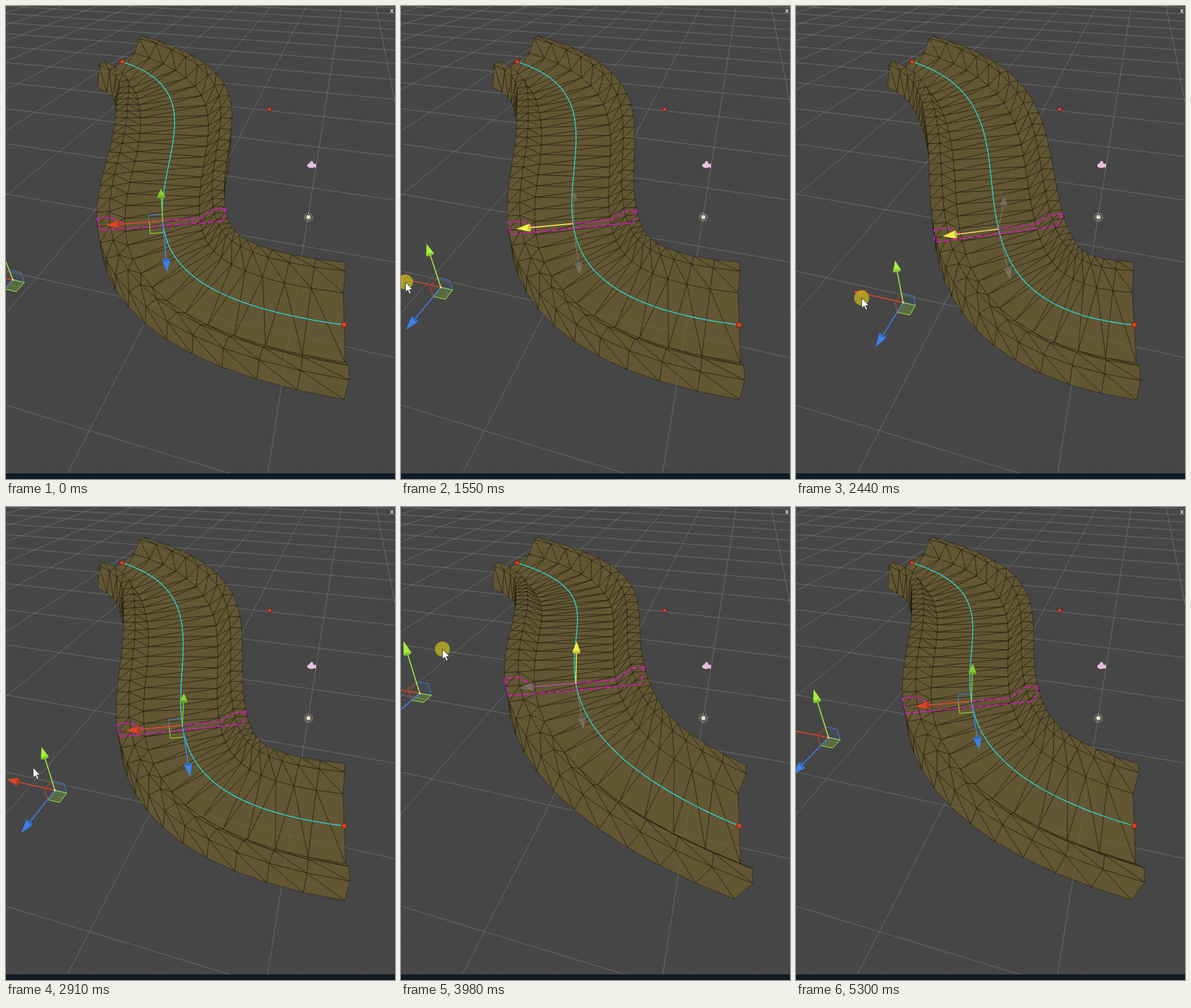
An HTML page with a canvas that plays this animation: 620 by 755 pixels, repeating every 5.82 s.

```html
<!DOCTYPE html>
<html lang="en">
<head>
<meta charset="utf-8">
<title>Spline mesh editing</title>
<style>
  html, body { margin: 0; width: 100%; height: 100%; overflow: hidden; background: #464646; }
  canvas { display: block; }
</style>
</head>
<body>
<canvas id="stage" width="620" height="755"></canvas>
<script>
const g = document.getElementById('stage').getContext('2d');
const LOOP = 5820, FOCAL = 663, CX = 310, CY = 377;

// Vectors live in camera space: x right, y down, z is depth.
const add = (a, b, s = 1) => a.map((v, i) => v + b[i] * s);
const cross = (a, b) => [a[1] * b[2] - a[2] * b[1], a[2] * b[0] - a[0] * b[2], a[0] * b[1] - a[1] * b[0]];
const unit = a => { const n = Math.hypot(...a); return a.map(v => v / n); };
const project = p => [CX + FOCAL * p[0] / p[2], CY + FOCAL * p[1] / p[2]];
const unproject = (x, y, depth) => [(x - CX) * depth / FOCAL, (y - CY) * depth / FOCAL, depth];

// World axes from their vanishing points.
const VANISH_X = [-2600, -157], VANISH_Z = [559, -157];
const AXIS_X = unit(unproject(...VANISH_X, FOCAL));
const AXIS_Z = unit(unproject(...VANISH_Z, FOCAL));
const UP = unit(unproject(310, 1200, FOCAL)).map(v => -v);
const BACK = AXIS_Z.map(v => -v), RIGHT = AXIS_X.map(v => -v);

const START = unproject(185, 89, 1), HANDLE_A = unproject(420, 165, 0.98);
const HANDLE_B = unproject(11, 437, 0.86), END = unproject(539, 509, 0.71);
const KNOT = 0.614, RINGS = 30;
const PROFILE = [[-.13, .03], [-.105, .03], [-.078, 0], [.078, 0], [.105, .03], [.13, .03], [.13, -.02], [-.13, -.02]];

const RED = '#dc4527', GREEN = '#a3f03c', BLUE = '#3d82ea', YELLOW = '#f3ee4a', GREY = 'rgba(140,140,130,.5)';

// Rows are time, value, ...
const SLIDE = [[1320, 0], [1820, .219], [2050, .283], [2440, .227], [2780, .0984]];
const LIFT = [[3150, 0], [3720, .088], [3980, .229], [4250, .283], [4480, .283], [4860, .1354]];
const POINTER = [
  [20, 430, 687], [600, 11, 484], [720, -45, 428], [1320, -45, 428], [1820, 109, 465],
  [2050, 168, 479], [2440, 105, 466], [2780, 18, 447], [2910, 43, 416], [3050, 58, 393],
  [3150, 58, 393], [3720, 62, 332], [3980, 66, 227], [4250, 70, 188], [4480, 70, 188],
  [4880, 84, 300], [5080, 243, 406], [5300, 625, 690]
];

// Monotone cubic interpolation through the rows.
function track(rows, t, col = 1) {
  const last = rows.length - 1;
  if (t <= rows[0][0]) return rows[0][col];
  if (t >= rows[last][0]) return rows[last][col];
  const i = rows.findIndex(r => r[0] > t) - 1;
  const slope = n => (rows[n + 1][col] - rows[n][col]) / (rows[n + 1][0] - rows[n][0]);
  const tangent = n => {
    if (n === 0 || n === last) return 0;
    const a = slope(n - 1), b = slope(n);
    return a * b > 0 ? 2 * a * b / (a + b) : 0;
  };
  const span = rows[i + 1][0] - rows[i][0], u = (t - rows[i][0]) / span, v = 1 - u;
  return rows[i][col] * (1 + 2 * u) * v * v + rows[i + 1][col] * u * u * (3 - 2 * u)
    + span * u * v * (tangent(i) * v - tangent(i + 1) * u);
}

function path(points, close) {
  g.beginPath();
  points.forEach(p => g.lineTo(p[0], p[1]));
  if (close) g.closePath();
}
function stroke(points, color, width = 1, close = false) {
  path(points, close);
  g.strokeStyle = color;
  g.lineWidth = width;
  g.stroke();
}
function fill(points, color) {
  path(points, true);
  g.fillStyle = color;
  g.fill();
}
function oval(x, y, rx, ry, angle, color) {
  g.beginPath();
  g.ellipse(x, y, rx, ry, angle, 0, 7);
  g.fillStyle = color;
  g.fill();
}
function disc(x, y, r, color, rim) {
  oval(x, y, r, r, 0, color);
  if (rim) { g.strokeStyle = rim; g.lineWidth = 1; g.stroke(); }
}

const gridOrigin = unproject(452, 524, 2.871);
function gridLine(vanish, axis, n, color) {
  const p = project(add(gridOrigin, axis, n));
  const dx = p[0] - vanish[0], dy = p[1] - vanish[1], reach = 5000 / Math.hypot(dx, dy);
  stroke([vanish, [vanish[0] + dx * reach, vanish[1] + dy * reach]], color);
}
function drawGrid(alpha) {
  const fade = g.createLinearGradient(0, 755, 0, 260);
  fade.addColorStop(0, `rgba(170,170,170,${alpha * .15})`);
  fade.addColorStop(1, 'rgba(170,170,170,0)');
  for (let n = -26; n < 20; n++) if (n % 10) gridLine(VANISH_X, AXIS_Z, n / 10, fade);
  for (let n = -18; n < 42; n++) if (n % 10) gridLine(VANISH_Z, AXIS_X, n / 10, fade);
  const major = `rgba(175,175,175,${alpha})`;
  for (let n = -2; n < 14; n++) gridLine(VANISH_X, AXIS_Z, n, major);
  for (let n = -1; n < 13; n++) gridLine(VANISH_Z, AXIS_X, n, major);
}

function makeCurve(handleB) {
  const c = [START, HANDLE_A, handleB, END];
  const mix = weights => weights.reduce((sum, w, i) => add(sum, c[i], w), [0, 0, 0]);
  return t => {
    const s = 1 - t;
    const pos = mix([s * s * s, 3 * s * s * t, 3 * s * t * t, t * t * t]);
    const dir = unit(mix([-s * s, s * s - 2 * s * t, 2 * s * t - t * t, t * t]));
    const side = unit(cross(dir, UP));
    return { pos, dir, side, normal: cross(side, dir) };
  };
}
const section = f => PROFILE.map(([a, h]) => add(add(f.pos, f.side, a), f.normal, h));

function drawMesh(curve) {
  const rings = Array.from({ length: RINGS + 1 }, (_, i) => section(curve(i / RINGS)));
  const faces = [];
  const addFace = corners => {
    const p = corners.map(project);
    const area = (p[1][0] - p[0][0]) * (p[2][1] - p[0][1]) - (p[2][0] - p[0][0]) * (p[1][1] - p[0][1]);
    if (area < 0) faces.push({ p, depth: corners.reduce((sum, v) => sum + v[2], 0) });
  };
  for (let i = 0; i < RINGS; i++) {
    for (let k = 0; k < PROFILE.length; k++) {
      const m = (k + 1) % PROFILE.length, a = rings[i], b = rings[i + 1];
      addFace([a[k], a[m], b[m]]);
      addFace([a[k], b[m], b[k]]);
    }
  }
  faces.sort((a, b) => b.depth - a.depth);
  g.lineJoin = 'round';
  for (const { p } of faces) {
    fill(p, '#625633');
    stroke(p, 'rgba(14,12,4,.6)', .75, true);
  }
}

function arrow(origin, axis, color) {
  const size = origin[2] * .135;
  const o = project(origin), base = project(add(origin, axis, size * .77)), tip = project(add(origin, axis, size));
  stroke([o, base], color, 1.6);
  const angle = Math.atan2(tip[1] - base[1], tip[0] - base[0]);
  const nx = -Math.sin(angle) * 6.5, ny = Math.cos(angle) * 6.5;
  fill([tip, [base[0] + nx, base[1] + ny], [base[0] - nx, base[1] - ny]], color);
  oval(base[0], base[1], 2.2, 6.5, angle, color);
  oval(base[0], base[1], 2.2, 6.5, angle, 'rgba(0,0,0,.18)');
}
function plate(origin, a, b, color, opacity) {
  const s = origin[2] * .032, q = add(origin, a, s);
  const pts = [origin, q, add(q, b, s), add(origin, b, s)].map(project);
  g.globalAlpha = opacity;
  fill(pts, color);
  g.globalAlpha = 1;
  stroke(pts, color, 1, true);
}

function drawHandle(p) {
  plate(p, UP, BACK, RED, .06);
  plate(p, RIGHT, UP, BLUE, .08);
  plate(p, RIGHT, BACK, GREEN, .22);
  arrow(p, AXIS_X, RED);
  arrow(p, BACK, BLUE);
  arrow(p, UP, GREEN);
  disc(...project(p), 1.5, '#ffd9a0');
}
function drawKnot(f, drag, hover) {
  const tint = (name, color) => !drag ? color : drag === name ? YELLOW : GREY;
  if (!drag) {
    plate(f.pos, f.side, f.normal, BLUE, .03);
    plate(f.pos, f.side, f.dir, GREEN, .03);
  }
  arrow(f.pos, f.side, hover ? '#d6cf92' : tint('x', RED));
  arrow(f.pos, f.dir, tint('z', BLUE));
  arrow(f.pos, f.normal, tint('y', '#86cf35'));
}

function drawIcons() {
  const pink = '#e9bfe6';
  oval(486.5, 254.5, 6.5, 4, 0, pink);
  disc(487, 250, 2.6, pink);
  fill([[489, 255], [494, 251], [494, 259]], pink);
  for (let i = 0; i < 12; i++) {
    const a = i * Math.PI / 6, c = Math.cos(a), s = Math.sin(a);
    stroke([[482 + c * 5, 337 + s * 5], [482 + c * 7.5, 337 + s * 7.5]], '#c9c0aa');
  }
  disc(482, 337, 3.8, '#eae0c8', '#6b6355');
  g.fillStyle = '#eed0ee';
  g.font = 'bold 11px Arial, "Liberation Sans", sans-serif';
  g.fillText('x', 612, 11);
}

function drawPointer(x, y, pressed) {
  if (pressed) disc(x, y, 12, 'rgba(186,176,32,.82)');
  const shape = [[0, 0], [0, 16.5], [3.8, 13], [6.4, 19], [9, 17.9], [6.4, 12], [11.5, 12]];
  const pts = shape.map(p => [x + p[0], y + p[1]]);
  fill(pts, '#fff');
  stroke(pts, '#222', .9, true);
}

function draw(t) {
  g.fillStyle = '#464646';
  g.fillRect(0, 0, 620, 755);
  drawGrid(.24);

  const handle = add(add(HANDLE_B, AXIS_X, -track(SLIDE, t)), UP, track(LIFT, t));
  const curve = makeCurve(handle);
  const drag = t >= 1320 && t < 2780 ? 'x' : t >= 3150 && t < 4870 ? 'y' : '';
  drawMesh(curve);
  drawGrid(.13);
  drawIcons();

  const line = Array.from({ length: 81 }, (_, i) => project(curve(i / 80).pos));
  stroke(line, '#1fe6e6', 1.3);

  const knot = curve(KNOT);
  g.setLineDash([9, 4]);
  stroke(section(knot).map(project), '#ff00ee', 1.5, true);
  g.setLineDash([]);

  drawKnot(knot, drag, t >= 700 && t < 1090);
  drawHandle(handle);
  disc(...project(START), 3.5, '#dc3f20', '#5e1d10');
  disc(...project(HANDLE_A), 3.2, '#dc4526', '#5e1d10');
  disc(...project(END), 4.2, '#dc3f20', '#5e1d10');

  if (t >= 20 && t < 5300) drawPointer(track(POINTER, t, 1), track(POINTER, t, 2), drag !== '');

  g.fillStyle = '#101b25';
  g.fillRect(0, 746, 620, 9);
}

const began = performance.now();
function tick() {
  draw((performance.now() - began) % LOOP);
  requestAnimationFrame(tick);
}
tick();
</script>
</body>
</html>
```
